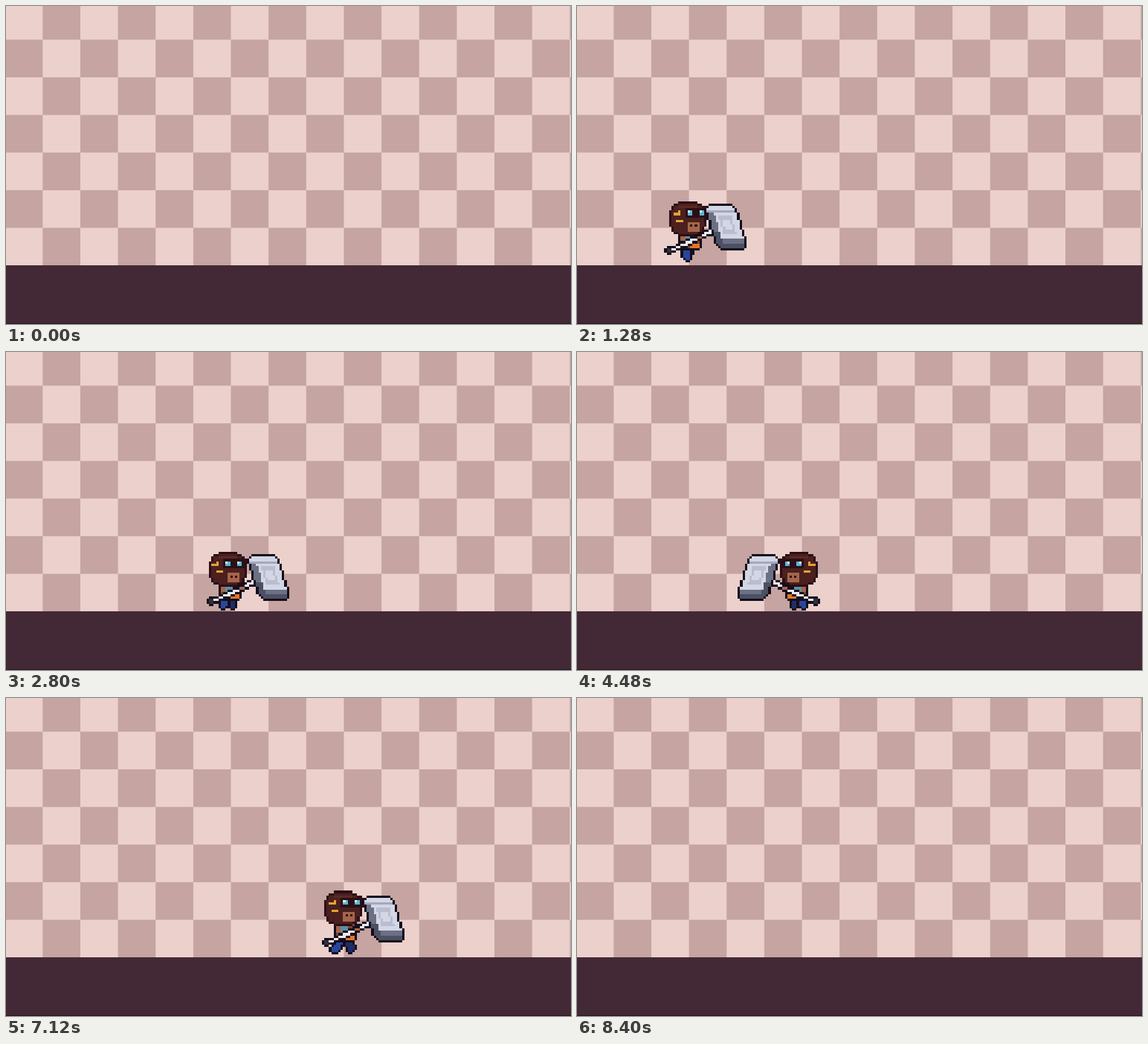
Write an HTML page with a canvas that moves like this. It is 760 px wide and 428 px high and loops after 8.88 s.

```html
<!DOCTYPE html>
<html lang="en">
<head>
<meta charset="utf-8">
<title>Hammer runner</title>
<style>
  html, body { margin: 0; width: 100%; height: 100%; overflow: hidden; background: #432935; }
  canvas { display: block; width: 760px; height: 428px; }
</style>
</head>
<body>
<canvas id="stage" width="760" height="428"></canvas>
<script>
const ctx = document.getElementById('stage').getContext('2d');
const LOOP = 8880, STEP = 80, PIXEL = 3.164, TILE = 50.64;
const FLOOR = 349, FEET = 348, COLS = 38, ROWS = 28, MIRROR = 597;
const INK = '#160d1d', HAIR_INK = '#2b0f17', HAIR = '#4b201e', HAIR_LIGHT = '#5c2a22';
const SKIN = '#a5654a', SKIN_DARK = '#7b4237', GOLD = '#e3a238', ORANGE = '#e27627';
const BLUE = '#28479b', NAVY = '#1f2d66', TOP = '#5f8ea1', WHITE = '#eceaf0';
const STEEL = '#d3d6e4', STEEL_MID = '#a4a8bc', STEEL_DARK = '#6b7085', STEEL_DEEP = '#4c5063';

const sprite = new Map();
let layer = new Map();
const keyOf = (x, y) => y * 100 + x;

// Colours every art pixel for which shade(x, y) returns a colour.
function paint(shade) {
  for (let y = 0; y < ROWS; y++)
    for (let x = 0; x < COLS; x++) {
      const color = shade(x + 0.5, y + 0.5);
      if (color) layer.set(keyOf(x, y), { x, y, color });
    }
}

const rect = (color, x, y, w, h) =>
  paint((px, py) => px > x && px < x + w && py > y && py < y + h && color);

const blob = (color, cx, cy, rx, ry, power) =>
  paint((x, y) => Math.abs((x - cx) / rx) ** power + Math.abs((y - cy) / ry) ** power < 1 && color);

function line(color, x0, y0, x1, y1, width) {
  const dx = x1 - x0, dy = y1 - y0;
  paint((x, y) => {
    const along = ((x - x0) * dx + (y - y0) * dy) / (dx * dx + dy * dy);
    const away = Math.hypot(x - x0 - along * dx, y - y0 - along * dy);
    return along >= 0 && along <= 1 && away < width / 2 && color;
  });
}

// Draws one part, rings it with ink and lays it over the sprite.
function part(ink, draw) {
  layer = new Map();
  draw();
  for (const { x, y } of layer.values())
    for (const [i, j] of [[x - 1, y], [x + 1, y], [x, y - 1], [x, y + 1]])
      if (!sprite.has(keyOf(i, j)) || !layer.has(keyOf(i, j))) sprite.set(keyOf(i, j), { x: i, y: j, color: ink });
  for (const [key, cell] of layer) sprite.set(key, cell);
}

function drawLeg(color, hip, foot, sole) {
  part(INK, () => {
    line(color, hip, 21, foot, sole, 2.6);
    rect(color, foot - 1.5, sole - 2, 3, 2);
  });
}

function drawLegs({ running, swing, rise }) {
  const sole = running ? 26 : 27, reach = running ? 5 * swing : 2;
  drawLeg(NAVY, 10, 9 + reach, sole - Math.max(0, rise));
  drawLeg(BLUE, 8, 9 - reach, sole - Math.max(0, -rise));
}

function drawBody(dy) {
  part(INK, () => {
    blob(SKIN_DARK, 10, 19 + dy, 4.2, 4, 3);
    rect(SKIN, 6, 17 + dy, 2, 3);
    rect(TOP, 8, 16 + dy, 3, 4);
    rect(ORANGE, 10, 21 + dy, 4, 2);
  });
}

function drawHead(dx, dy, hairDy) {
  part(HAIR_INK, () => {
    blob(HAIR, 9, 10.5 + hairDy, 7, 6.6, 2.8);
    blob(HAIR_LIGHT, 9, 5.5 + hairDy, 4, 1, 2);
    rect(HAIR_INK, 7 + dx, 6 + dy, 9, 4);
    for (const x of [8 + dx, 13 + dx]) {
      rect('#58b9d2', x, 7 + dy, 2, 2);
      rect(WHITE, x, 7 + dy, 1, 1);
    }
    rect(GOLD, 2 + dx, 8 + dy, 3, 1);
    rect(GOLD, 4 + dx, 7 + dy, 1, 1);
    rect(GOLD, 4, 11 + dy, 3, 1);
    blob(SKIN, 11.5, 14 + dy, 2.6, 2.2, 4);
    for (const x of [10, 12]) rect(HAIR_INK, x, 13 + dy, 1, 1);
  });
}

function drawHammer(dx, dy) {
  part(INK, () => {
    line(WHITE, 3 + dx, 24 + dy, 22 + dx, 14.6 + dy, 1.3);
    rect('#30303b', 1 + dx, 23 + dy, 2, 2);
  });
  part(INK, () => rect(SKIN, 14 + dx, 18 + dy, 2, 1));
  part(INK, () => paint((x, y) => {
    const v = (y - dy - 14) / 9;
    const u = (x - dx - 26.3 - 2.7 * v) / 6;
    if (Math.abs(u) ** 7 + Math.abs(v) ** 7 >= 1) return;
    if (u < -0.55 && v > -0.7) return v > 0.2 ? STEEL_DEEP : STEEL_DARK;
    if (v > 0.55) return v > 0.8 ? STEEL_DEEP : STEEL_DARK;
    if (Math.abs(v + 0.68) < 0.06) return STEEL_MID;
    const ring = Math.max(Math.abs(u - 0.15) / 0.45, Math.abs(v + 0.1) / 0.42);
    return ring < 1 && ring > 0.6 ? '#b9bdcf' : STEEL;
  }));
}

function poseAt(t) {
  if (t < 1840 || t >= 6560) {
    const x = t < 1840 ? 120.5 + (t - 1280) / STEP * 21 : 601 + (t - 7760) / STEP * 22;
    const angle = (t - 1280) / 576 * 2 * Math.PI;
    const swing = Math.sin(angle), spread = Math.round(Math.abs(swing));
    return { running: true, x, swing, rise: Math.cos(angle), lift: -2,
             face: -2 - spread, hair: -2 - spread, lean: 1, trail: spread - 1 };
  }
  const breath = (1 - Math.cos((t - 2840) / 800 * 2 * Math.PI)) / 2;
  return { x: 270, rise: 0, lift: -Math.round(breath), face: -Math.round(breath),
           hair: -Math.round(2 * breath), lean: 0, trail: 0,
           flipped: t >= 3520 && t < 4720 };
}

function drawRunner(pose) {
  sprite.clear();
  drawLegs(pose);
  drawBody(pose.lift);
  drawHead(pose.lean, pose.face, pose.hair);
  drawHammer(pose.trail, pose.lift);
  const column = x => Math.round(pose.x + x * PIXEL);
  const row = y => Math.round(FEET + (y - ROWS) * PIXEL);
  for (const { x, y, color } of sprite.values()) {
    const width = column(x + 1) - column(x);
    const left = pose.flipped ? MIRROR - column(x + 1) : column(x);
    ctx.fillStyle = color;
    ctx.fillRect(left, row(y), width, row(y + 1) - row(y));
  }
}

function drawRoom() {
  ctx.fillStyle = '#ebd0cb';
  ctx.fillRect(0, 0, 760, FLOOR);
  ctx.fillStyle = '#c5a4a1';
  for (let row = 0; row < 7; row++)
    for (let col = 1 - row % 2; col < 16; col += 2)
      ctx.fillRect(49.35 + (col - 1) * TILE, 45.35 + (row - 1) * TILE, TILE, TILE);
  ctx.fillStyle = '#432935';
  ctx.fillRect(0, FLOOR, 760, 78);
  ctx.fillStyle = '#21151b';
  ctx.fillRect(0, 427, 760, 1);
}

let shown = -1;
function tick(now) {
  const t = Math.floor(now % LOOP / STEP) * STEP;
  if (t !== shown) {
    shown = t;
    drawRoom();
    if (t >= 400 && t < 8400) drawRunner(poseAt(t));
  }
  requestAnimationFrame(tick);
}
tick(performance.now());
</script>
</body>
</html>
```
